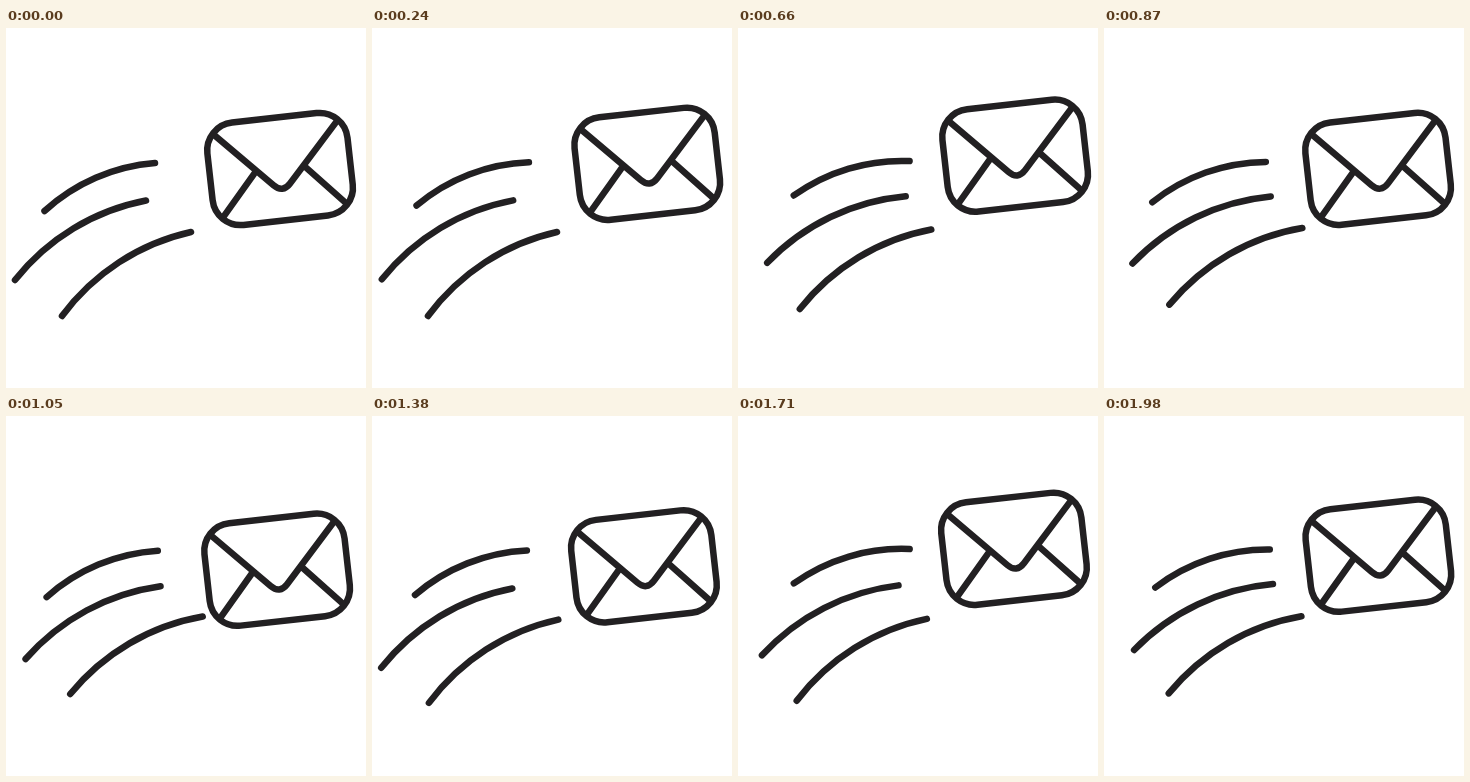
Recreate the animation shown at these times as an HTML page. Size 360 px wide and 360 px high, loop 2040 ms.

```html
<!DOCTYPE html>
<html lang="en">
<head>
<meta charset="utf-8">
<title>Flying envelope</title>
<style>
  html, body { margin: 0; height: 100%; overflow: hidden; background: #fff; }
  svg { display: block; width: 100vw; height: 100vh; }
</style>
</head>
<body>
<svg viewBox="0 0 360 360" fill="none" stroke="#222022" stroke-width="6.5" stroke-linecap="round" stroke-linejoin="round">
  <g id="envelope">
    <rect x="-70.5" y="-51" width="141" height="103" rx="28"/>
    <path d="M-62-41L-8.3 16Q0 24.8 8.3 16L62-41M-61 41L-24.5 .3M61 41L24.5 .3"/>
  </g>
  <path class="trail"/>
  <path class="trail"/>
  <path class="trail"/>
</svg>
<script>
  const LOOP = 2040;
  const SWING = 588;  // time of one stroke, up or down
  const DELAY = 158;  // each trail starts this much after the one above

  const heights = [0, -14.5, 16, -8.7, 16];

  // End points x0, y0, x1, y1 at both ends of the slide.
  const trails = [
    { r: 185, from: [38.5, 183, 149, 135], to: [56.3, 167, 172.3, 133] },
    { r: 220, from: [9, 252, 140, 172.5], to: [30.5, 233.7, 169.5, 168] },
    { r: 220, from: [56, 288, 185, 204], to: [65.5, 276.5, 198.5, 200] }
  ];

  const envelope = document.getElementById('envelope');
  const paths = document.querySelectorAll('.trail');

  const mix = (a, b, k) => a + (b - a) * k;
  const wave = x => (1 - Math.cos(Math.PI * x)) / 2;

  function draw() {
    const t = performance.now() % LOOP;
    const stroke = Math.floor(t / SWING);
    const dy = mix(heights[stroke], heights[stroke + 1], wave(t / SWING - stroke));
    envelope.setAttribute('transform', `translate(${274 - .23 * dy} ${140.5 + dy}) rotate(-6.4)`);

    trails.forEach(({ r, from, to }, i) => {
      const k = wave(Math.max(0, t - 8 - i * DELAY) / SWING);
      const [x0, y0, x1, y1] = from.map((a, j) => mix(a, to[j], k));
      paths[i].setAttribute('d', `M${x0} ${y0}A${r} ${r} 0 0 1 ${x1} ${y1}`);
    });
    requestAnimationFrame(draw);
  }
  draw();
</script>
</body>
</html>
```
